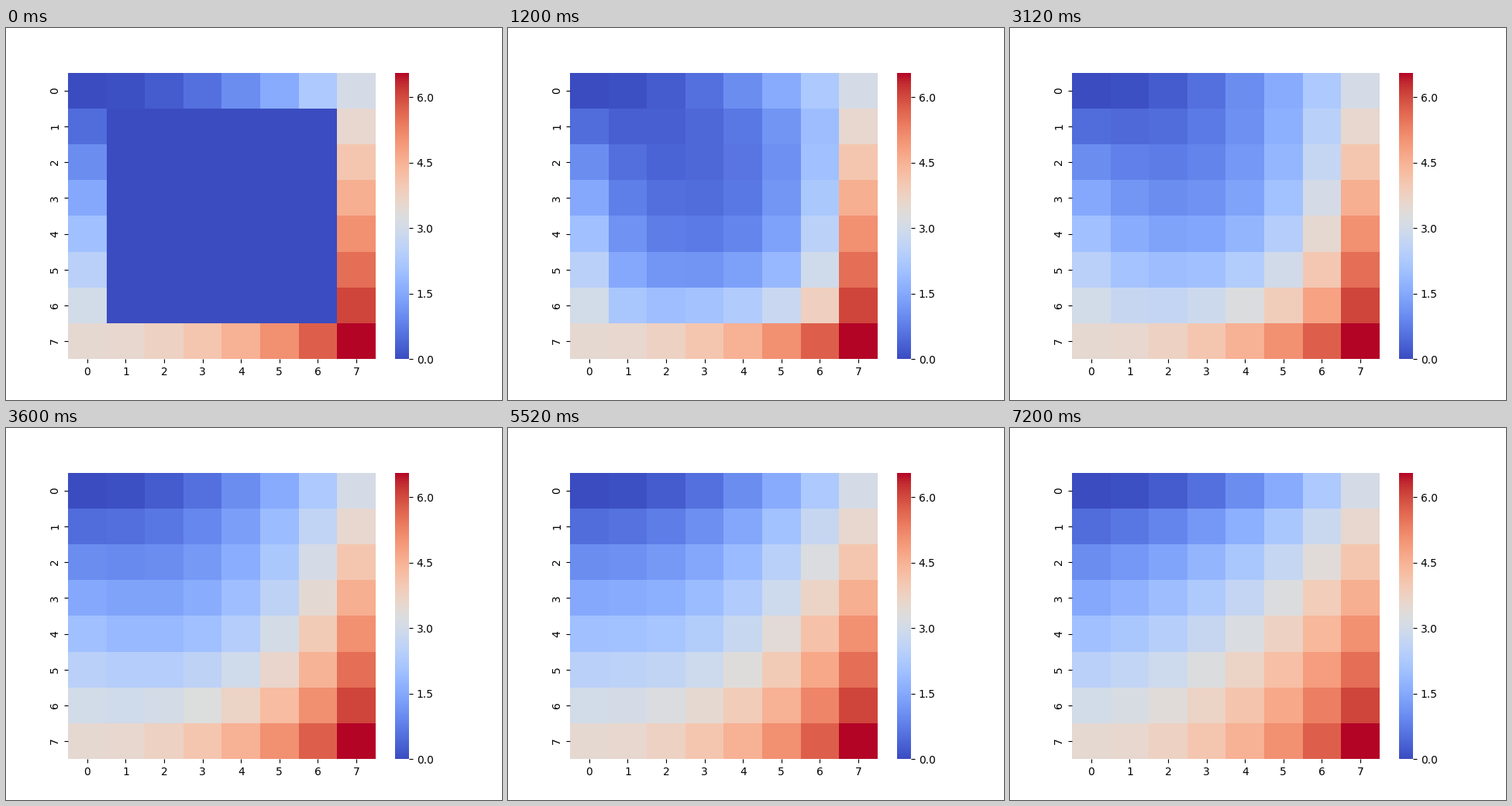
A matplotlib script for the animation above (8 s loop, 640x480 px).

```python
import numpy as np
import matplotlib.pyplot as plt
from matplotlib.animation import FuncAnimation

N = 8            # grid points per side
H = 0.25         # grid spacing
DT = 0.1         # time step of the heat equation
STEPS = 7
HOLD = 3         # animation frames per time step
FRAMES = 20
INTERVAL = 400   # ms


def boundary_field():
    """x^2 + 2y on the rim, zero inside."""
    pos = np.arange(N) * H
    field = pos[None, :] ** 2 + 2 * pos[:, None]
    field[1:-1, 1:-1] = 0
    return field


def implicit_matrix():
    """Backward Euler operator for the inner points."""
    m = N - 2
    second = 2 * np.eye(m) - np.eye(m, k=1) - np.eye(m, k=-1)
    laplace = np.kron(second, np.eye(m)) + np.kron(np.eye(m), second)
    return np.eye(m * m) + DT / H ** 2 * laplace


def solve_heat():
    field = boundary_field()
    rim = field.copy()
    inflow = rim[:-2, 1:-1] + rim[2:, 1:-1] + rim[1:-1, :-2] + rim[1:-1, 2:]
    matrix = implicit_matrix()
    states = [field.copy()]
    for _ in range(STEPS - 1):
        rhs = field[1:-1, 1:-1] + DT / H ** 2 * inflow
        inner = np.linalg.solve(matrix, rhs.ravel())
        field[1:-1, 1:-1] = inner.reshape(N - 2, N - 2)
        states.append(field.copy())
    return states


states = solve_heat()

fig, ax = plt.subplots(figsize=(6.4, 4.8), dpi=100)
mesh = ax.pcolormesh(states[0], cmap="coolwarm", vmin=0, vmax=states[0].max())
ax.set(xlim=(0, N), ylim=(N, 0))
ax.spines[:].set_visible(False)

centers = np.arange(N) + 0.5
ax.set_xticks(centers, range(N))
ax.set_yticks(centers, range(N), rotation="vertical", va="center")

bar = fig.colorbar(mesh, ax=ax, ticks=np.arange(0, 6.1, 1.5))
bar.ax.set_yticklabels([f"{v:.1f}" for v in np.arange(0, 6.1, 1.5)])
bar.outline.set_linewidth(0)


def update(frame):
    mesh.set_array(states[frame // HOLD])
    return (mesh,)


anim = FuncAnimation(fig, update, frames=FRAMES, interval=INTERVAL,
                     repeat=True, repeat_delay=0, blit=False)
plt.show()
```
